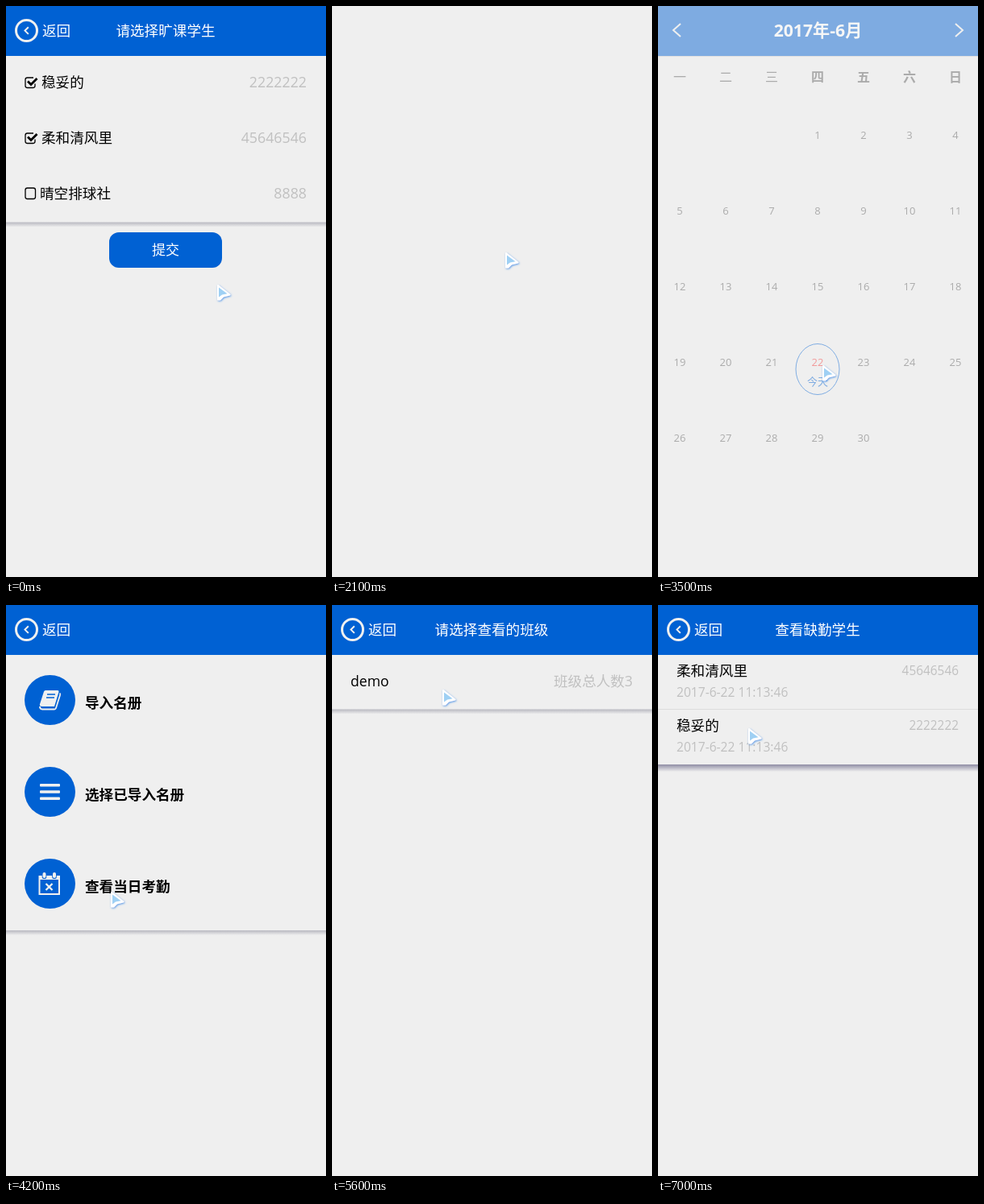
An HTML page for the animation above (7700 ms loop, 397 px wide and 709 px high).

```html
<!DOCTYPE html>
<html lang="zh-CN">
<head>
<meta charset="utf-8">
<style>
html, body { margin: 0; width: 100%; height: 100%; overflow: hidden; background: #efefef; }
svg { display: block; width: 397px; height: 709px; }
text { font-family: "Open Sans", "Noto Sans CJK SC", "Noto Sans CJK", sans-serif; white-space: pre; }
</style>
</head>
<body>
<svg viewBox="0 0 397 709">
  <defs>
    <linearGradient id="shade" x2="0" y2="1">
      <stop stop-color="var(--shade)"/>
      <stop offset="1" stop-color="#efefef"/>
    </linearGradient>
    <filter id="glow" x="-40%" y="-40%" width="190%" height="190%">
      <feDropShadow dx=".8" dy="1" stdDeviation=".9" flood-color="#3f8ee6" flood-opacity=".9"/>
    </filter>
  </defs>
  <g id="page"></g>
  <g id="cursor" stroke-linejoin="round">
    <path d="M2 2V19.500H4.500L8.500 15.500 16.500 13.500Z" fill="#fff" stroke="#fff" stroke-width="2" filter="url(#glow)"/>
    <path d="M3 4.500V16.500L7 13.500 13.500 12.300Z" fill="#9fd0f4"/>
  </g>
</svg>
<script>
const STEP = 700, BLUE = '#0061d3', PALE = '#f0f0f0', GRAY = '#c0c0c0';
const page = document.getElementById('page'), cursor = document.getElementById('cursor');

// Text centred vertically on y
const text = (x, y, s, { size = 17.6, fill = '#000', anchor = 'start', weight = 400 } = {}) =>
  `<text x="${x}" y="${y + size * 0.36}" font-size="${size}" fill="${fill}" text-anchor="${anchor}" font-weight="${weight}">${s}</text>`;
const rect = (x, y, w, h, fill, rx = 0) =>
  `<rect x="${x}" y="${y}" width="${w}" height="${h}" rx="${rx}" fill="${fill}"/>`;
const line = (d, color, width) =>
  `<path d="${d}" fill="none" stroke="${color}" stroke-width="${width}"/>`;
const shadow = (y, h = 6, color = '#b8b8c0') => {
  page.style.setProperty('--shade', color);
  document.documentElement.style.setProperty('--shade', color);
  return rect(0, y, 397, h, 'url(#shade)');
};
const gray = (y, s, size = 17.8) => text(373, y, s, { size, fill: GRAY, anchor: 'end' });

const header = (title, fill = BLUE, ink = '#fff') => rect(0, 0, 397, 62, fill) +
  `<circle cx="25.500" cy="30.500" r="13" fill="none" stroke="${PALE}" stroke-width="3"/>` +
  line('M27.800 26.300 23.500 30.600 27.800 34.900', PALE, 2) +
  text(45, 30.5, '返回', { fill: ink }) +
  text(198, 30.5, title, { fill: ink, anchor: 'middle' });

function checkRow(y, name, id, checked) {
  const box = checked
    ? `M36 ${y + 1.5}V${y + 4}Q36 ${y + 6.5} 33.500 ${y + 6.5}H26.500Q24 ${y + 6.5} 24 ${y + 4}V${y - 3.5}Q24 ${y - 6} 26.500 ${y - 6}H34`
    : `M26.500 ${y - 7}H34Q36.500 ${y - 7} 36.500 ${y - 4.5}V${y + 4}Q36.500 ${y + 6.5} 34 ${y + 6.5}H26.500Q24 ${y + 6.5} 24 ${y + 4}V${y - 4.5}Q24 ${y - 7} 26.500 ${y - 7}Z`;
  return line(box, '#000', 1.3) +
    (checked ? line(`M27 ${y - 1.5}L31 ${y + 2.5} 38.500 ${y - 5}`, '#000', 2.8) : '') +
    text(checked ? 44 : 42, y, name) + gray(y, id);
}

const students = () => header('请选择旷课学生') +
  checkRow(95, '稳妥的', '2222222', true) +
  checkRow(164, '柔和清风里', '45646546', true) +
  checkRow(233, '晴空排球社', '8888', false) +
  shadow(268.5) + rect(128, 281, 140, 44, BLUE, 12) +
  text(198, 303, '提交', { size: 17, fill: '#fff', anchor: 'middle' });

function calendar(opacity) {
  const mid = { anchor: 'middle', fill: '#606060', size: 13 };
  const column = i => 27 + 57 * i;
  let out = rect(0, 0, 397, 62, BLUE) + rect(0, 62, 397, 1, '#d0d0d0') +
    line('M28 22 19 30 28 38M369 22 378 30 369 38', PALE, 2) +
    text(198.5, 30.5, '2017年-6月', { size: 21.2, fill: '#fff', anchor: 'middle', weight: 700 });
  [...'一二三四五六日'].forEach((s, i) => {
    out += text(column(i), 88, s, { ...mid, size: 16, weight: i < 3 ? 400 : 700 });
  });
  for (let day = 1; day <= 30; day++) {
    const cell = day + 2;
    out += text(column(cell % 7), 160 + 94 * Math.floor(cell / 7), day,
      day === 22 ? { ...mid, fill: '#f43c3c' } : mid);
  }
  out += `<ellipse cx="198" cy="451" rx="27" ry="31.500" fill="none" stroke="${BLUE}"/>` +
    text(198, 466, '今天', { ...mid, fill: BLUE });
  return `<g opacity="${opacity}">${out}</g>`;
}

function menu() {
  const labels = ['导入名册', '选择已导入名册', '查看当日考勤'];
  const items = labels.map((s, i) =>
    `<ellipse cx="54.500" cy="${118 + 114 * i}" rx="31.500" ry="31" fill="${BLUE}"/>` +
    text(98, 122 + 114 * i, s, { weight: 700 })).join('');
  const book = `<path d="M49 106H64Q66 106 65.500 108L60 126H45Q41 126 42 123L47 107.500Q47.500 106 49 106Z" fill="${PALE}"/>` +
    line('M51 111H61M50 115H60', BLUE, 1.6) +
    line('M66.500 109.500Q67.500 110 67 112L62 128Q61.500 129.500 60 129.500H45Q42 129.500 42 126', PALE, 1.8);
  const bars = [222, 230.2, 238.4].map(y => rect(42, y, 25, 3.6, PALE, 1)).join('');
  const date = line('M41.500 337H66V359H41.500Z', PALE, 2) + rect(41, 336, 25, 5, PALE) +
    [45.5, 58].map(x => rect(x - .8, 331.5, 5.6, 8.5, BLUE, 2) + rect(x, 332, 4, 7, PALE, 2)).join('') +
    line('M49.500 346 57.500 354M57.500 346 49.500 354', PALE, 2.3);
  return header('') + items + book + bars + date + shadow(404);
}

const CLASS_TITLE = '请选择查看的班级';
const fadingClasses = () => header(CLASS_TITLE, '#e0dff0', PALE) + text(23, 95, 'demo', { fill: '#dcdcdc' });
const classes = () => header(CLASS_TITLE) + text(23, 95, 'demo') + gray(95, '班级总人数3', 17.6) + shadow(129.5);

const absentRow = (y, name, id) => text(23, y, name) + gray(y - .5, id, 15.4) +
  text(23, y + 26, '2017-6-22 11:13:46', { size: 15.6, fill: GRAY });
const absent = () => header('查看缺勤学生') + absentRow(82, '柔和清风里', '45646546') +
  rect(0, 129, 397, 1, '#dcdcdc') + absentRow(150, '稳妥的', '2222222') + shadow(198, 9, '#8f8da4');

// Each step: page, cursor x, cursor y
const steps = [
  [students, 261, 345],
  [students, 229, 316],
  [students, 214, 305],
  [() => '', 214, 305],
  [() => calendar(1), 208, 385],
  [() => calendar(0.47), 203, 445],
  [menu, 129, 355],
  [fadingClasses, 134, 322],
  [classes, 136, 104],
  [absent, 118, 211],
  [absent, 111, 152]
];

let shown = -1;
const start = performance.now();
function tick() {
  const i = Math.floor((performance.now() - start) / STEP) % steps.length;
  if (i !== shown) {
    const [draw, x, y] = steps[shown = i];
    page.innerHTML = draw();
    cursor.setAttribute('transform', `translate(${x} ${y})`);
  }
  requestAnimationFrame(tick);
}
tick();
</script>
</body>
</html>
```
